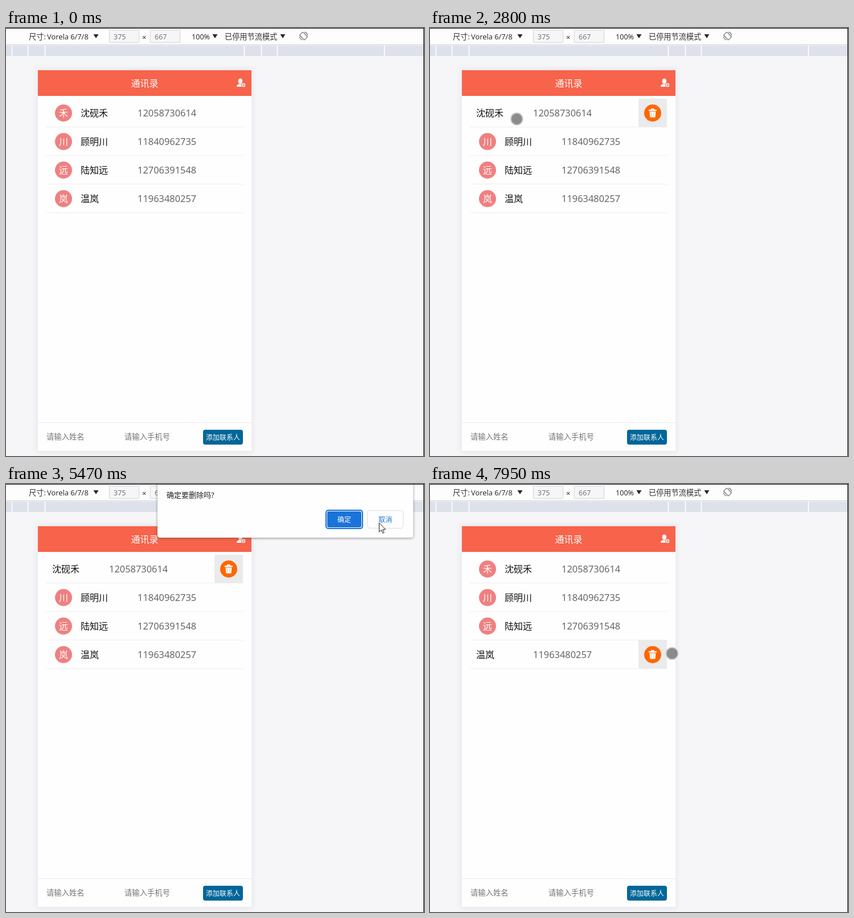
An HTML page for the animation above (7.99 s loop, 734x750 px).

```html
<!DOCTYPE html>
<html lang="zh">
<head>
<meta charset="utf-8">
<title>通讯录</title>
<style>
  html, body { margin: 0; width: 100%; height: 100%; overflow: hidden; background: #f6f6f8; }
  svg { display: block; width: 734px; height: 750px; }
  text { font-family: "Noto Sans", "Noto Sans CJK SC", "Noto Sans CJK", sans-serif; font-size: 16px; }
  .bar text { font-size: 13.2px; fill: #303033; }
  .bar text.dim { fill: #77777c; font-size: 12.5px; }
  .field { fill: #f6f6f8; stroke: #d0d2d6; }
  .hint { font-size: 13.33px; fill: #757575; }
  .phone { fill: #666; font-size: 16.4px; }
  .light { fill: #fff; }
  .mid { text-anchor: middle; }
  .small { font-size: 12px; }
</style>
</head>
<body>
<svg viewBox="0 0 734 750" xmlns="http://www.w3.org/2000/svg">
  <defs>
    <clipPath id="list"><rect x="71" y="120" width="345" height="210"/></clipPath>
    <radialGradient id="smudge">
      <stop offset=".2" stop-color="#222" stop-opacity=".8"/>
      <stop offset="1" stop-color="#222" stop-opacity="0"/>
    </radialGradient>
    <filter id="glow" x="-10%" y="-10%" width="120%" height="120%"><feGaussianBlur stdDeviation="4"/></filter>
    <filter id="shade" x="-10%" y="-20%" width="120%" height="150%">
      <feDropShadow dx="0" dy="1" stdDeviation="2" flood-color="#444" flood-opacity=".6"/>
    </filter>
    <path id="caret" d="M-4.5 11h9l-4.500 7z" fill="#28282b"/>
  </defs>

  <rect width="734" height="750" fill="#f6f6f8"/>
  <g class="bar">
    <rect width="734" height="29" fill="#fdfdfd"/>
    <path d="M0 29.5H734" stroke="#cccdd1"/>
    <rect y="31" width="734" height="18" fill="#dde2ea"/>
    <path id="ticks" stroke="#fafbfc" stroke-width="2"/>
    <rect class="field" x="181.5" y="3.5" width="52" height="22" rx="1"/>
    <rect class="field" x="253.5" y="3.5" width="52" height="22" rx="1"/>
    <text x="40" y="20">尺寸:</text>
    <text x="72" y="20" style="font-size:12.8px">Vorela 6/7/8</text>
    <text class="dim" x="189" y="20">375</text>
    <text x="239" y="21">×</text>
    <text class="dim" x="261" y="20">667</text>
    <text x="326" y="20" style="font-size:12.6px">100%</text>
    <text x="384" y="20">已停用节流模式</text>
    <use href="#caret" x="158"/>
    <use href="#caret" x="367"/>
    <use href="#caret" x="486"/>
    <g fill="none" stroke="#6c6d72" stroke-width="1.2">
      <rect x="518.5" y="8" width="8" height="12" rx="1" transform="rotate(-45 522.5 14)"/>
      <path d="M515.5 15A7 7 0 0 0 521 20.8M529.5 13A7 7 0 0 0 524 7.2"/>
    </g>
  </g>

  <rect x="53" y="71" width="381" height="673" fill="#e9e9ee" filter="url(#glow)"/>
  <rect x="56" y="74" width="375" height="667" fill="#fefefe"/>
  <rect x="56" y="74" width="375" height="45" fill="#f7634b"/>
  <text class="light mid" x="243.5" y="103">通讯录</text>
  <g class="light">
    <ellipse cx="411.5" cy="93" rx="3.7" ry="4.5"/>
    <path d="M405 103q0-4 4.5-5h4q4 1 4 5z"/>
    <circle cx="417" cy="100" r="4" stroke="#f7634b"/>
    <path d="M414.5 100h5M417 97.5v5" stroke="#f7634b"/>
  </g>

  <g id="rows" clip-path="url(#list)"></g>

  <path d="M56 691.5H431" stroke="#ebebee"/>
  <text class="hint" x="71" y="721">请输入姓名</text>
  <text class="hint" x="208" y="721">请输入手机号</text>
  <rect x="346" y="704" width="70" height="26" rx="4" fill="#006699"/>
  <text class="light mid small" x="381" y="722">添加联系人</text>

  <g id="dialog">
    <rect x="266" y="-10" width="449" height="104" rx="4" fill="#fefefe" filter="url(#shade)"/>
    <text x="282" y="24" style="font-size:13px" fill="#222">确定要删除吗?</text>
    <rect x="562" y="46" width="64" height="32" rx="4" fill="#fefefe" stroke="#1a6fd0" stroke-width="2"/>
    <rect x="564" y="48" width="60" height="28" rx="3" fill="#1a73d8"/>
    <text class="light mid small" x="594" y="67">确定</text>
    <rect x="634.5" y="46.5" width="63" height="31" rx="4" fill="#fefefe" stroke="#dadce0"/>
    <text class="mid small" x="666" y="67" fill="#1a73d8">取消</text>
  </g>

  <g id="pointer">
    <path id="arrow" d="M.5 .5V16.5L4.3 13L6.8 18.7L9.2 17.7L6.8 12.2H11.8Z" fill="#fff" stroke="#111"/>
    <g id="touch">
      <circle r="10.5" fill="#333" fill-opacity=".57"/>
      <circle r="10.3" fill="none" stroke="#c8c8c8" stroke-width="1.8"/>
    </g>
    <circle id="press" r="13" fill="url(#smudge)"/>
  </g>

  <path d="M0 .5H734M733.5 0V750" stroke="#111"/>
</svg>
<script>
const LOOP = 7990;
const ROW = 50;
const $ = id => document.getElementById(id);

// Ruler marks sit in pairs around the middle of the phone.
$('ticks').setAttribute('d', [175, 205, 233, 421]
  .map(d => `M${243.5 - d} 31v18M${243.5 + d} 31v18`).join(''));

const contacts = [
  ['沈砚禾', '12058730614'],
  ['顾明川', '11840962735'],
  ['陆知远', '12706391548'],
  ['温岚', '11963480257'],
];

$('rows').innerHTML = contacts.map(([name, phone], i) => `
  <g transform="translate(0 ${i * ROW})">
    <g id="row${i}">
      <circle cx="101" cy="149" r="15" fill="#f08080"/>
      <text class="light mid" x="101" y="155">${name.at(-1)}</text>
      <text x="131" y="155" fill="#111">${name}</text>
      <text class="phone" x="231" y="155">${phone}</text>
      <rect x="416" y="124" width="${ROW}" height="49" fill="#ebebec"/>
      <circle cx="441" cy="149" r="15" fill="#ff6600"/>
      <path class="light" d="M434 143h4v-2h6v2h4v2.5h-14zM435.5 146.5h11l-1 10h-9z"/>
      <path d="M439 148v6.5M443 148v6.5" stroke="#ffb580"/>
    </g>
    <path d="M71 173.5H416" stroke="#dcdce0" stroke-dasharray="1 1"/>
  </g>`).join('');

function play(id, prop, steps, easing = 'linear') {
  const all = [[0, steps[0][1]], ...steps, [LOOP, steps.at(-1)[1]]];
  $(id).animate(
    all.map(([time, value]) => ({ offset: time / LOOP, [prop]: value, easing })),
    { duration: LOOP, iterations: Infinity });
}

const move = (id, steps, easing) =>
  play(id, 'transform', steps.map(([t, x, y = 0]) => [t, `translate(${x}px, ${y}px)`]), easing);

const show = (id, ...spans) =>
  play(id, 'opacity', [[0, 0], ...spans.flatMap(([from, to]) => [[from, 1], [to, 0]])], 'step-end');

const slide = (id, from, to, back = LOOP) =>
  move(id, [[from, 0], [to, -ROW], [back, -ROW], [Math.min(back + 180, LOOP), back < LOOP ? 0 : -ROW]]);

const touchIn = 1080, pressAt = 3400, dialogAt = 3900, touchAgain = 6190;
const cancelAt = 5640;

move('pointer', [
  [280, 494, 269], [1050, 440, 170],                    // rest, then head for the list
  [1340, 260, 158], [1700, 260, 158], [2200, 189, 161], // touch the first row
  [2310, 189, 161], [2580, 134, 160], [2760, 134, 160], // swipe left
  [3360, 402, 150], [4090, 402, 150],                   // press delete
  [4860, 650, 80], [cancelAt, 656, 64],                 // cancel
  [5960, 598, 148], [6450, 240, 320], [7140, 225, 304], // last row
  [7400, 172, 300], [7900, 425, 297],                   // swipe, then back
]);
show('arrow', [0, touchIn], [dialogAt, touchAgain]);
show('touch', [touchIn, pressAt], [touchAgain, LOOP]);
show('press', [pressAt, dialogAt]);

slide('row0', 2330, 2570, cancelAt + 80);
slide('row3', 7140, 7390);
play('dialog', 'opacity', [[3690, 0], [3850, 1], [cancelAt, 1], [cancelAt + 100, 0]]);
</script>
</body>
</html>
```
